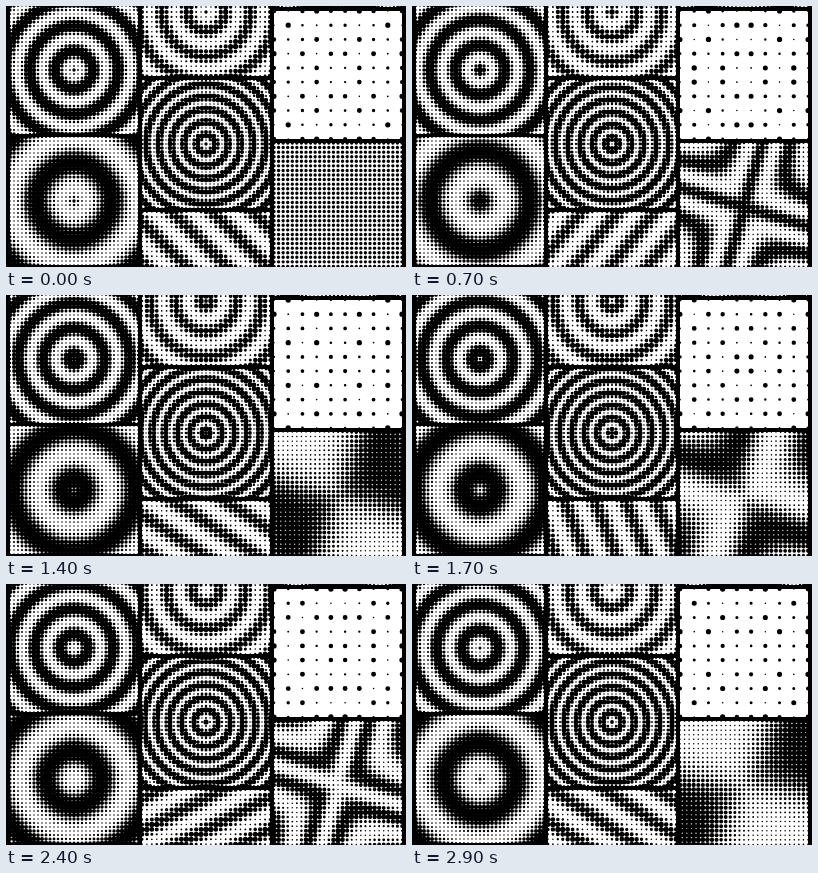
Animation of 400x261 px, one loop 3 s. Source, as an HTML page with a canvas:

```html
<!DOCTYPE html>
<html lang="en">
<head>
<meta charset="utf-8">
<title>Halftone waves</title>
<style>
  html, body { margin: 0; width: 100%; height: 100%; overflow: hidden; background: #000; }
  canvas { display: block; }
</style>
</head>
<body>
<canvas id="stage" width="400" height="261"></canvas>
<script>
const ctx = document.getElementById('stage').getContext('2d');
const SIZE = 128, UNIT = 4, LOOP = 3000, STEP = 100, TAU = Math.PI * 2;

// Each wave maps an offset from the tile centre (in UNITs) and a phase to -1 (dark) .. 1 (light).
const rings = (k, direction = 1) => (x, y, p) =>
  Math.sin(k * Math.hypot(x, y) - direction * p);

const stripes = (x, y, p) => {
  const angle = p - Math.PI / 4;
  return Math.sin(0.88 * (x * Math.cos(angle) + y * Math.sin(angle)));
};

const TILT = 0.285;
const cross = (x, y, p) => {
  const lobes = -Math.sin(2 * (Math.atan2(y, x) - TILT));
  return Math.sin(0.5 * Math.hypot(x, y) * lobes * Math.sin(p) - p);
};

const tiles = [
  { x: 4, y: 0, cells: 32, wave: rings(1) },
  { x: 4, y: 131, cells: 32, wave: rings(0.5) },
  { x: 136, y: -58, cells: 26, wave: rings(1) },
  { x: 136, y: 74, cells: 32, wave: rings(2, -1) },
  { x: 136, y: 206, cells: 26, wave: stripes },
  { x: 268, y: -127, cells: 32, wave: rings(1) },
  { x: 268, y: 5, cells: 9, wave: rings(1) },
  { x: 268, y: 137, cells: 28, wave: cross },
];

function drawTile({ x, y, cells, wave }, phase) {
  const pitch = SIZE / cells;
  ctx.fillStyle = '#fff';
  ctx.fillRect(x, y, SIZE, SIZE);
  ctx.fillStyle = '#000';
  ctx.beginPath();
  for (let row = 0; row <= cells; row++) {
    for (let col = 0; col <= cells; col++) {
      const dx = col * pitch, dy = row * pitch;
      const value = wave((dx - SIZE / 2) / UNIT, (dy - SIZE / 2) / UNIT, phase);
      const radius = 1.7 - 0.95 * value;
      ctx.moveTo(x + dx + radius, y + dy);
      ctx.arc(x + dx, y + dy, radius, 0, TAU);
    }
  }
  ctx.fill();
}

function draw(now) {
  const time = Math.floor((now % LOOP) / STEP) * STEP;
  ctx.fillStyle = '#000';
  ctx.fillRect(0, 0, 400, 261);
  for (const tile of tiles) drawTile(tile, TAU * time / LOOP);
}

const start = performance.now();
function tick() {
  draw(performance.now() - start);
  requestAnimationFrame(tick);
}
tick();
</script>
</body>
</html>
```
